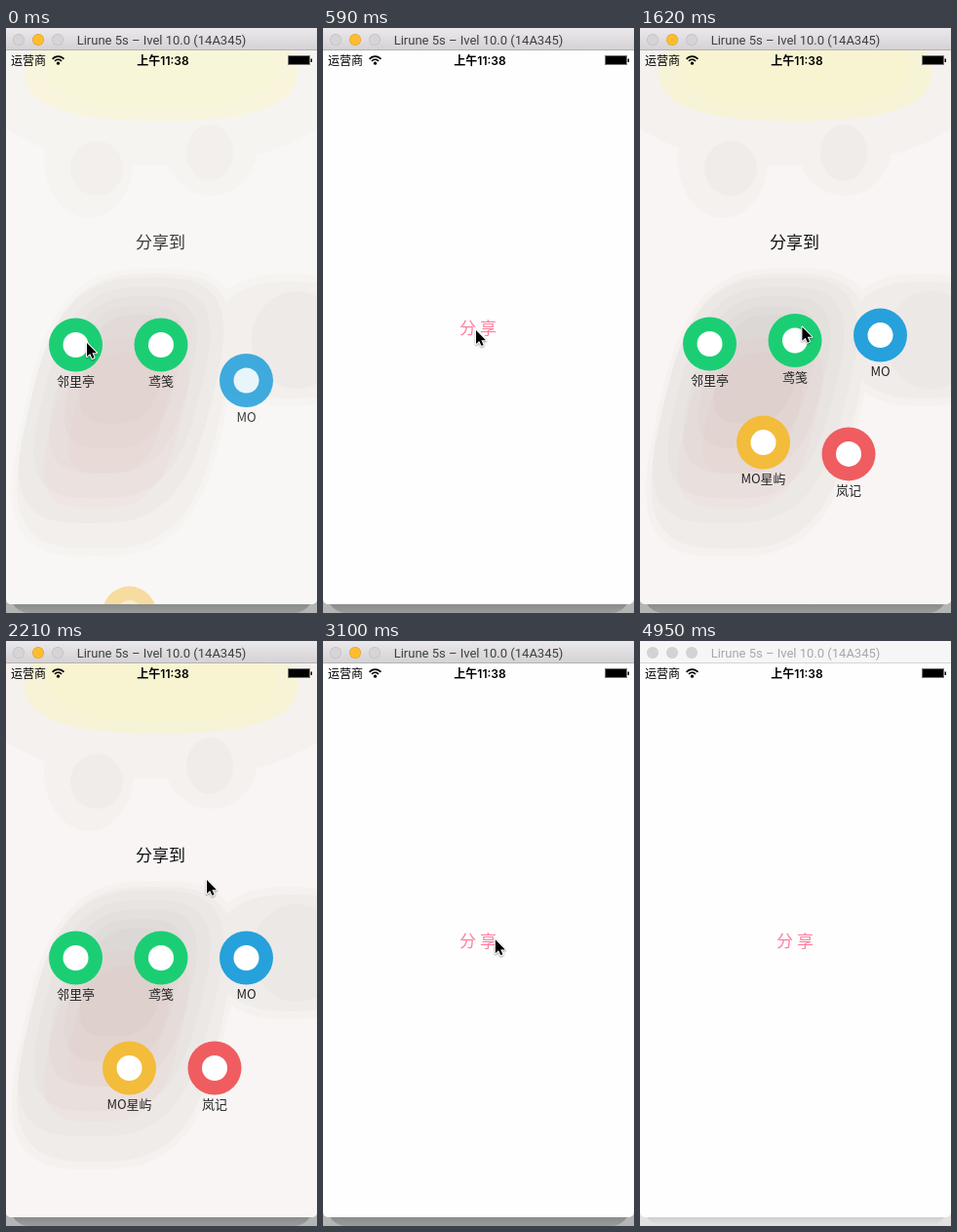
An HTML page with a canvas for the animation above (5.05 s loop, 319 by 600 pixels).

```html
<!DOCTYPE html>
<html lang="zh">
<head>
<meta charset="utf-8">
<style>
  html, body { margin: 0; width: 100%; height: 100%; overflow: hidden; background: #fff; }
  canvas { display: block; width: 319px; height: 600px; }
</style>
</head>
<body>
<canvas id="stage" width="319" height="600"></canvas>
<script>
const ctx = document.getElementById('stage').getContext('2d');
const LOOP = 5050, TOP = 23, BOTTOM = 591, WIDTH = 319;
const CJK = '"Noto Sans CJK SC", "Noto Sans CJK", sans-serif';

// The screen refreshes at a steady, slow rate.
const TICK = 147.7, TICK_LEAD = 8;

const FIRST_HIDE = -123, SHOW = 1268, SECOND_HIDE = 2287;
const GAP = 47.5, FADE_TIME = 320, TRAVEL = 300;
const PRESS = 1180, RELEASE = 1470, INACTIVE = 4950;

const POINTER_START = { x: 83, y: 323 }, POINTER_END = 3980;
const MOVES = [
  { at: 190, time: 370, x: 157, y: 310 },
  { at: 1450, time: 450, x: 185, y: 300 },
  { at: 1920, time: 160, x: 206, y: 245 },
  { at: 2820, time: 330, x: 175, y: 310 },
  { at: 3480, time: 210, x: 244, y: 494 }
];

const BUTTONS = [
  { x: 71.5, y: 325, color: '#1bce74', label: '邻里亭' },
  { x: 159, y: 325, color: '#1bce74', label: '鸢笺' },
  { x: 246.5, y: 325, color: '#26a1db', label: 'MO' },
  { x: 126.5, y: 438, color: '#f3bc3a', label: 'MO星屿' },
  { x: 214, y: 438, color: '#ef5d60', label: '岚记' }
];

const clamp = v => Math.min(1, Math.max(0, v));
const smooth = v => { v = clamp(v); return v * v * (3 - 2 * v); };

// Damped spring going from 1 to 0 with a small overshoot
function spring(ms) {
  const p = Math.max(0, ms) * 0.0143;
  return Math.exp(-p) * (Math.cos(p) + Math.sin(p));
}

function sheetState(t) {
  if (t >= SHOW && t < SECOND_HIDE) {
    return {
      fade: smooth((t - SHOW) / FADE_TIME),
      offset: i => spring(t - SHOW - i * GAP)
    };
  }
  const start = t < SHOW ? FIRST_HIDE : SECOND_HIDE;
  return {
    fade: 1 - smooth((t - start - 35) / FADE_TIME),
    offset: i => 1 - spring(t - start - (4 - i) * GAP)
  };
}

function pointerAt(t) {
  let { x, y } = POINTER_START;
  for (const m of MOVES) {
    const p = smooth((t - m.at) / m.time);
    x += (m.x - x) * p;
    y += (m.y - y) * p;
  }
  return [x, y];
}

function text(str, x, y, font, color, align = 'center') {
  ctx.font = font;
  ctx.fillStyle = color;
  ctx.textAlign = align;
  ctx.fillText(str, x, y);
}

function disc(x, y, r, color) {
  ctx.beginPath();
  ctx.arc(x, y, r, 0, Math.PI * 2);
  ctx.fillStyle = color;
  ctx.fill();
}

// Adds a slanted superellipse to the current path
function addBlob(cx, cy, rx, ry, power = 1, slant = 0) {
  const bulge = v => Math.sign(v) * Math.abs(v) ** power;
  for (let i = 0; i <= 60; i++) {
    const a = i / 60 * Math.PI * 2;
    const dy = ry * bulge(Math.sin(a));
    const x = cx + rx * bulge(Math.cos(a)) - slant * dy;
    if (i) ctx.lineTo(x, cy + dy);
    else ctx.moveTo(x, cy + dy);
  }
  ctx.closePath();
}

// Fills the union of several blobs with one colour
function layer(color, ...blobs) {
  ctx.beginPath();
  blobs.forEach(b => addBlob(...b));
  ctx.fillStyle = color;
  ctx.fill();
}

function drawBackdrop(fade) {
  if (fade <= 0) return;
  const shade = 'rgba(98,88,90,0.033)', haze = 'rgba(170,150,105,0.04)';
  ctx.globalAlpha = fade;
  ctx.fillStyle = '#f8f5f4';
  ctx.fillRect(0, TOP, WIDTH, BOTTOM - TOP);

  layer(haze, [160, 23, 205, 118, 0.9], [85, 135, 46, 60], [210, 122, 48, 50]);
  layer('rgba(252,246,150,0.28)', [159, 45, 140, 50, 0.8]);
  layer('rgba(252,240,140,0.06)', [159, 40, 118, 42, 0.8]);
  layer(shade, [93, 144, 27, 28]);
  layer(shade, [209, 128, 24, 29]);

  layer(haze, [122, 394, 104, 148, 0.65, 0.22], [290, 320, 82, 68, 0.8]);
  layer(shade, [122, 393, 99, 141, 0.65, 0.22], [292, 320, 78, 60, 0.8]);
  layer(shade, [298, 320, 46, 50]);
  for (let i = 0; i < 5; i++) {
    const k = 1 - i * 0.14;
    layer(shade, [118 + i, 382 - i * 8, 93 * k, 126 * k, 0.65, 0.25]);
  }
  layer('rgba(240,140,120,0.05)', [113, 405, 66, 88, 0.65, 0.25]);
  layer('rgba(225,125,110,0.04)', [116, 395, 46, 62, 0.65, 0.25]);
  ctx.globalAlpha = 1;
}

function drawButton(b, offset) {
  const y = b.y + offset * TRAVEL;
  ctx.globalAlpha = clamp(1 - offset);
  disc(b.x, y, 27.5, b.color);
  disc(b.x, y, 13, '#fff');
  text(b.label, b.x, y + 42, '13px ' + CJK, '#222');
  ctx.globalAlpha = 1;
}

function drawStatus() {
  text('运营商', 5, 38, '12px ' + CJK, '#000', 'left');
  text('上午11:38', 161, 38, '600 12px Inter, ' + CJK, '#000');
  ctx.strokeStyle = '#000';
  ctx.lineWidth = 1.7;
  for (const r of [4.6, 7.8]) {
    ctx.beginPath();
    ctx.arc(53.5, 37, r, -Math.PI * 0.77, -Math.PI * 0.23);
    ctx.stroke();
  }
  disc(53.5, 36.2, 1.6, '#000');
  ctx.lineWidth = 1;
  ctx.strokeStyle = '#777';
  ctx.strokeRect(289.5, 28.5, 22, 9);
  ctx.fillStyle = '#000';
  ctx.fillRect(290, 29, 21, 8);
  ctx.fillRect(312.5, 31.5, 1.5, 3.5);
}

function drawTitleBar(active) {
  const g = ctx.createLinearGradient(0, 0, 0, TOP);
  g.addColorStop(0, active ? '#ebe9eb' : '#f6f6f6');
  g.addColorStop(1, active ? '#d3d1d3' : '#f6f6f6');
  ctx.fillStyle = g;
  ctx.fillRect(0, 0, WIDTH, TOP);
  ctx.fillStyle = active ? '#b4b2b4' : '#d3d3d3';
  ctx.fillRect(0, TOP - 1, WIDTH, 1);
  [13, 33, 53].forEach((x, i) => {
    const lit = active && i === 1;
    disc(x, 12, 6, lit ? '#e0a02a' : active ? '#c0bec0' : '#cfcfcf');
    disc(x, 12, 5.3, lit ? '#ffbd2e' : active ? '#d6d4d6' : '#d3d3d3');
  });
  text('Lirune 5s – Ivel 10.0 (14A345)', 159.5, 17, '13px Roboto, sans-serif',
    active ? '#404040' : '#a8a8a8');
}

function drawShadow(active) {
  ctx.fillStyle = active ? '#b4b6b6' : '#e2e2e2';
  ctx.fillRect(0, 580, WIDTH, 20);
  const g = ctx.createLinearGradient(0, BOTTOM, 0, 600);
  g.addColorStop(0, active ? '#8b8d8d' : '#cfcfcf');
  g.addColorStop(1, active ? '#9a9c9c' : '#e4e4e4');
  ctx.beginPath();
  ctx.roundRect(4, 560, WIDTH - 8, 40, 22);
  ctx.fillStyle = g;
  ctx.fill();
}

function drawPointer(t) {
  if (t >= POINTER_END) return;
  const shape = [[0, 0], [0, 14], [3.2, 11], [5.5, 16], [7.6, 15], [5.4, 10.2], [10, 10.2]];
  ctx.save();
  ctx.translate(...pointerAt(t));
  ctx.beginPath();
  shape.forEach(p => ctx.lineTo(...p));
  ctx.closePath();
  ctx.lineJoin = 'round';
  ctx.lineWidth = 2;
  ctx.strokeStyle = '#fff';
  ctx.shadowColor = 'rgba(0,0,0,0.4)';
  ctx.shadowBlur = 2;
  ctx.shadowOffsetY = 1;
  ctx.stroke();
  ctx.shadowColor = 'transparent';
  ctx.fillStyle = '#000';
  ctx.fill();
  ctx.restore();
}

function draw(t, active) {
  const { fade, offset } = sheetState(t);
  drawShadow(active);

  ctx.save();
  ctx.beginPath();
  ctx.roundRect(0, 0, WIDTH, BOTTOM, [0, 0, 5, 5]);
  ctx.clip();
  ctx.fillStyle = '#fefefe';
  ctx.fillRect(0, TOP, WIDTH, BOTTOM - TOP);
  ctx.globalAlpha = t >= PRESS && t < RELEASE ? 0.38 : 1;
  text('分 享', 159, 314, '17px ' + CJK, '#ff7d9d');
  ctx.globalAlpha = 1;

  drawBackdrop(fade);
  ctx.globalAlpha = fade;
  text('分享到', 158.5, 226, '17px ' + CJK, '#111');
  ctx.globalAlpha = 1;
  BUTTONS.forEach((b, i) => drawButton(b, offset(i)));
  drawStatus();
  drawTitleBar(active);
  ctx.restore();

  drawPointer(t);
}

const begin = performance.now();
function frame() {
  const t = (performance.now() - begin) % LOOP;
  draw(Math.floor((t + TICK_LEAD) / TICK) * TICK, t < INACTIVE);
  requestAnimationFrame(frame);
}
frame();
</script>
</body>
</html>
```
